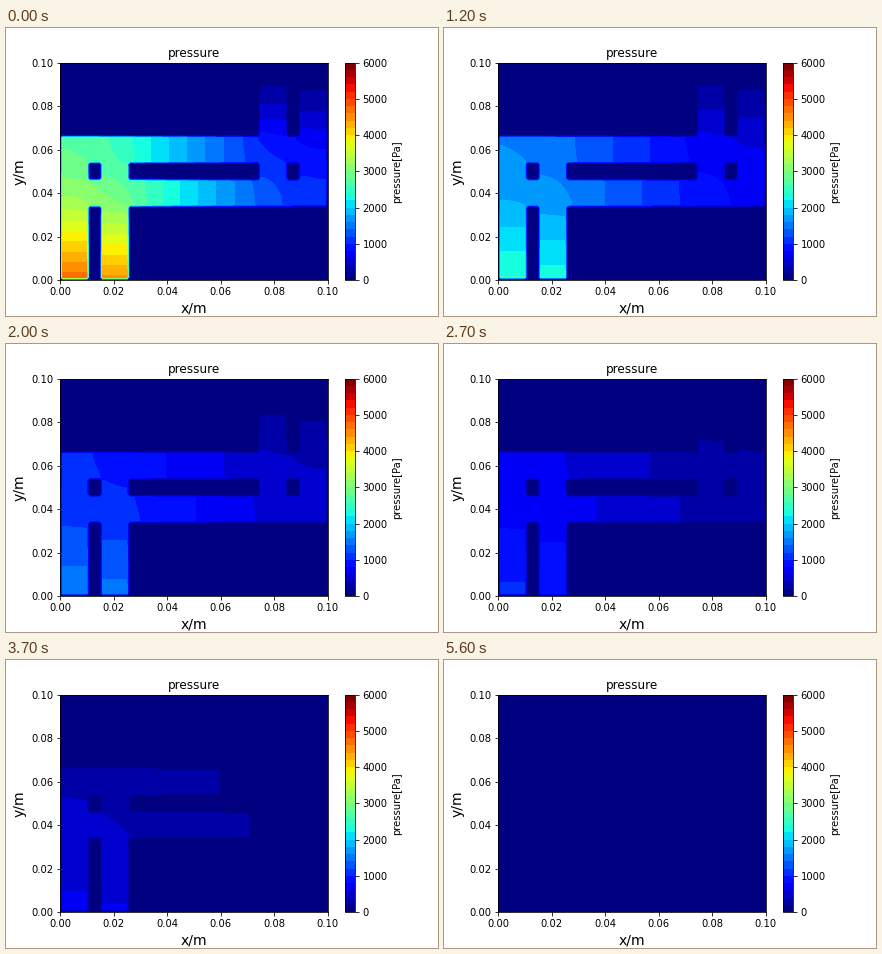
These frames come from a looping animation (432 by 288 pixels, 8000 ms). A matplotlib script:

```python
import numpy as np
import matplotlib.pyplot as plt
from matplotlib.animation import FuncAnimation
from matplotlib.cm import ScalarMappable
from matplotlib.colors import Normalize

NX, NY = 101, 76
FRAMES, STEP = 80, 100
END = 5600
LEVELS = np.arange(0, 6001, 200)
NORM = Normalize(0, 6000)
CMAP = plt.get_cmap("jet", len(LEVELS) - 1)


def pipe_mask():
    """Two inlets below, two channels across, two outlets above."""
    m = np.zeros((NY, NX), bool)
    m[1:50, 1:26] = True
    m[26:50, 1:100] = True
    m[26:75, 75:100] = True
    m[:26, 11:16] = False
    m[50:, 85:90] = False
    for a, b in ((11, 16), (26, 75), (85, 90)):
        m[35:41, a:b] = False
    return m


def neighbours(a):
    """Sum of the four neighbours, weighted for the cell shape."""
    wx = (NX - 1) / (NY - 1)
    s = np.zeros(a.shape)
    s[1:-1, 1:-1] = (wx * (a[1:-1, 2:] + a[1:-1, :-2])
                     + (a[2:, 1:-1] + a[:-2, 1:-1]) / wx)
    return s


def flow_potential(m, omega=1.96, rounds=1500):
    """Harmonic field: even inflow at the bottom, zero at the top."""
    count = neighbours(m.astype(float))
    count[-2] += m[-2] * (NY - 1) / (NX - 1)
    count[count == 0] = 1
    inflow = np.zeros(m.shape)
    inflow[1] = m[1]
    yy, xx = np.indices(m.shape)
    halves = [m & ((xx + yy) % 2 == k) for k in (0, 1)]
    phi = np.zeros(m.shape)
    for _ in range(rounds):
        for half in halves:
            new = (neighbours(phi) + inflow) / count
            phi += omega * half * (new - phi)
    return phi / phi.max()


phi = flow_potential(pipe_mask())


def pressure(t):
    if t >= END:
        return np.zeros(phi.shape)
    inlet = np.exp(np.interp(t, [0, 2700, 3700, END],
                             np.log([4700, 1040, 650, 198])))
    # the outlet lags behind once per swing
    bend = 1 + 0.3 * np.cos(np.pi * (t + 150) / 3700) ** 4
    return inlet * phi ** bend


fig, ax = plt.subplots(figsize=(6, 4), dpi=72)
fig.subplots_adjust(left=0.125, right=0.9, bottom=0.125, top=0.88)
bar = fig.colorbar(ScalarMappable(NORM, CMAP), ax=ax)
bar.set_label("pressure[Pa]", labelpad=5)
ax.set_title("pressure")
ax.set_xlabel("x/m", fontsize=14)
ax.set_ylabel("y/m", fontsize=14)
x = np.linspace(0, 0.1, NX)
y = np.linspace(0, 0.1, NY)
shown = []


def draw(i):
    while shown:
        shown.pop().remove()
    shown.append(ax.contourf(x, y, pressure(i * STEP), LEVELS,
                             cmap=CMAP, norm=NORM))
    ax.set_xlim(0, 0.1)
    ax.set_ylim(0, 0.1)
    return shown


anim = FuncAnimation(fig, draw, frames=FRAMES, init_func=lambda: draw(0),
                     interval=STEP, repeat=True, blit=False)
plt.show()
```
